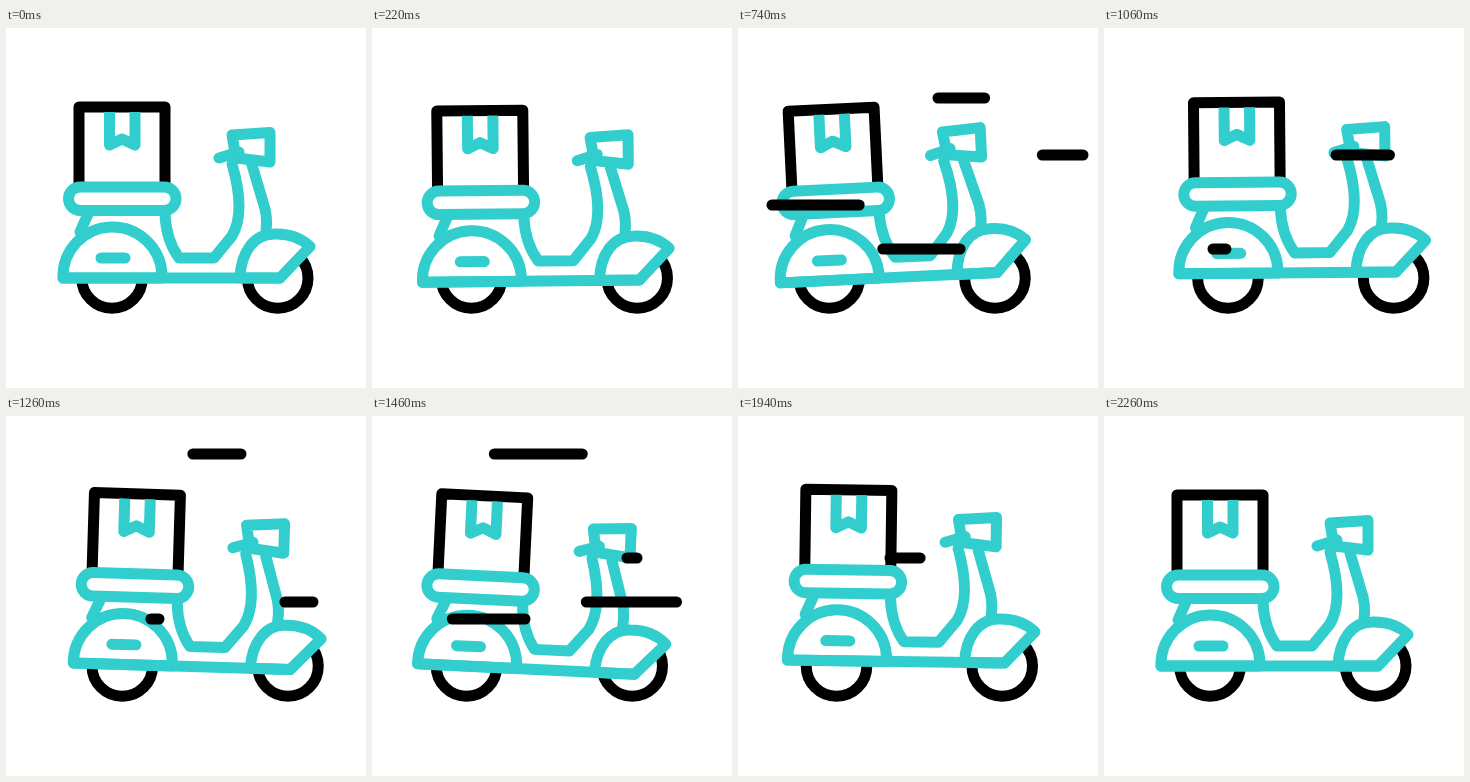
An HTML page for the animation above (2.4 s loop, 360 by 360 pixels).

```html
<!DOCTYPE html>
<html>
<head>
<meta charset="utf-8">
<style>
  html, body { margin: 0; width: 100%; height: 100%; overflow: hidden; background: #fff; }
  svg { display: block; width: 100%; height: 100%; stroke-width: 11; stroke-linecap: round; stroke-linejoin: round; }
</style>
</head>
<body>
<svg viewBox="0 0 360 360" fill="#fff" stroke="#000">
  <g id="wheels">
    <circle cx="106" cy="250" r="30.3"/>
    <circle cx="271.7" cy="250" r="30.3"/>
  </g>
  <g id="body">
    <path d="M73 156V79H159V156"/>
    <g stroke="#32cdcd">
      <path fill="none" stroke-linecap="butt" d="M103.500 84V117L116 111L129 117V84"/>
      <path fill="none" d="M82 186L74 204M159 186Q160 212 173 230H208L226 208Q240 184 226 136M246 137L257 174Q262 188 260 203"/>
      <path d="M57 250A49.500 49.500 0 0 1 156 247V250Z"/>
      <path d="M234 250C235 224 248 206 268 206Q290 205 304 218.500L274 250Z"/>
      <path fill="none" d="M57 250H274M95 230H119"/>
      <rect x="62.500" y="159" width="107.500" height="23.500" rx="11.750"/>
      <path d="M226 107L264 104.500V134L230 130Z"/>
      <path d="M213 130L233 124"/>
    </g>
  </g>
  <g id="streaks"></g>
</svg>
<script>
const LOOP = 2400, STREAK = 113;
const [wheels, body, streakGroup] = ['wheels', 'body', 'streaks'].map(id => document.getElementById(id));

// Key points [time, value] at a steady step
const evenly = (start, step, values) => values.map((v, i) => [start + i * step, v]);

const slide = evenly(40, 530, [0, -25, 18.5, -20.5, 0]);
const tilt = evenly(0, 735, [0, -2.75, 2.75, 0]);
const bounce = [...evenly(0, 480, [0, 7.2, -6, 3, -4.5]), [2260, 0]];

const clamp = v => Math.min(1, Math.max(0, v));
const ease = p => (1 - Math.cos(Math.PI * clamp(p))) / 2;

// Sum of the eased steps between neighbouring keys
const valueAt = (keys, t) => keys.slice(1).reduce((sum, [end, v], i) => {
  const [begin, from] = keys[i];
  return sum + (v - from) * ease((t - begin) / (end - begin));
}, 0);

// Each wave releases its streaks, given by their right ends, one gap apart
const wave = (start, gap, ...points) => points.map(([x, y], i) => {
  const el = document.createElementNS('http://www.w3.org/2000/svg', 'path');
  streakGroup.append(el);
  return { el, x, y, start: start + i * gap };
});

const streaks = [
  ...wave(276, 113, [313, 70], [147, 177], [222, 221], [345, 127]),
  ...wave(1112, 62, [235, 38], [307, 186], [153, 203]),
  ...wave(1430, 0, [265, 142])
];

function drawStreak({ el, x, y, start }, t) {
  const lead = clamp((t - start) / 350);
  const trail = clamp((t - start - 280) / 315);
  el.setAttribute('d', lead > trail ? `M${x - STREAK * trail} ${y}H${x - STREAK * lead}` : '');
}

function draw(now) {
  const t = now % LOOP;
  const x = valueAt(slide, t);
  wheels.setAttribute('transform', `translate(${x} 0)`);
  body.setAttribute('transform',
    `translate(${x} ${valueAt(bounce, t)}) rotate(${valueAt(tilt, t)} 165 250)`);
  streaks.forEach(s => drawStreak(s, t));
}

const began = performance.now();
function tick() {
  draw(performance.now() - began);
  requestAnimationFrame(tick);
}
tick();
</script>
</body>
</html>
```
